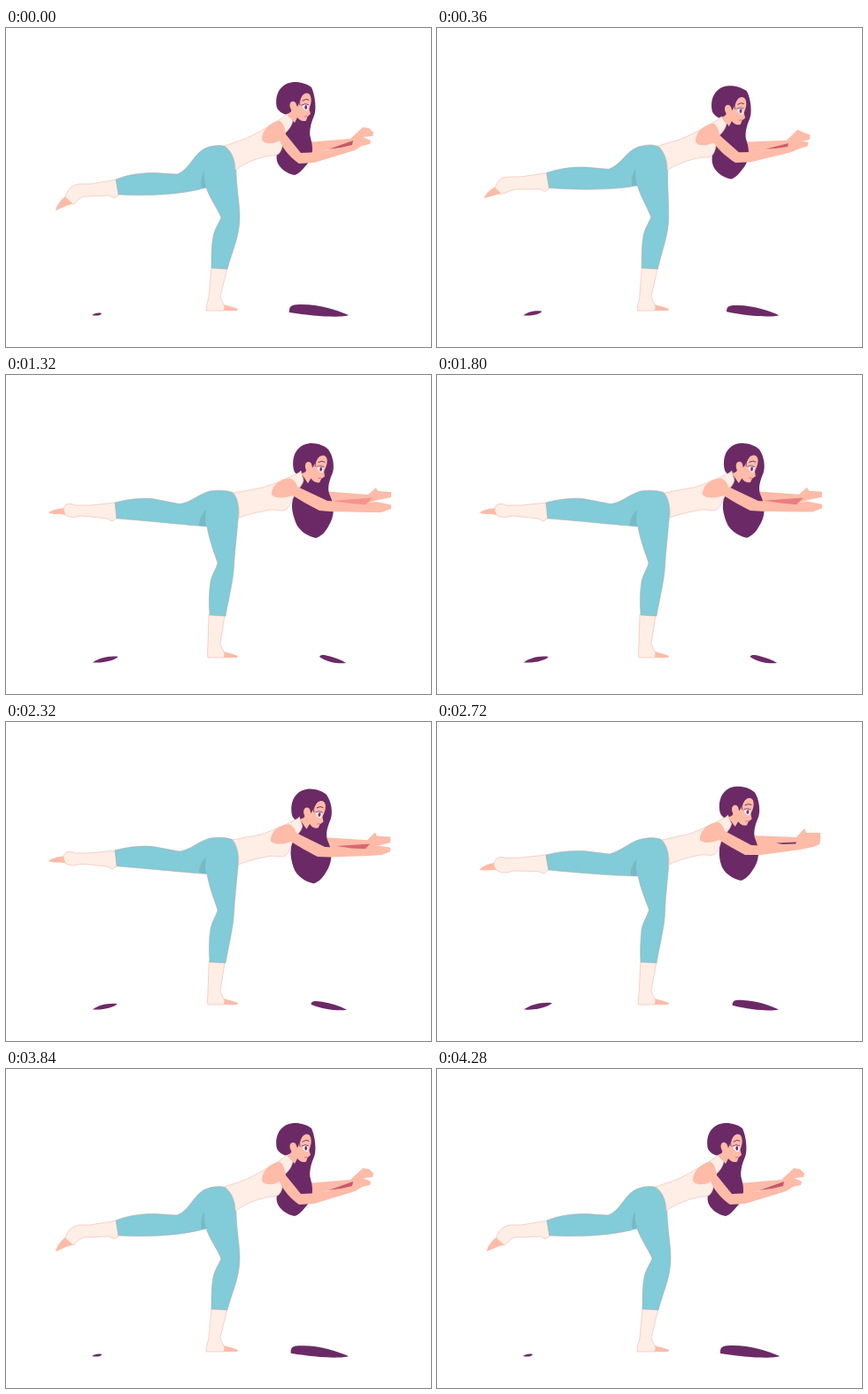
These frames come from a looping animation (480 px wide and 360 px high, 4.32 s). An HTML page:

```html
<!DOCTYPE html>
<html lang="en">
<head>
<meta charset="utf-8">
<title>Balance pose</title>
<style>
  html, body { margin: 0; width: 100%; height: 100%; overflow: hidden; background: #fff; }
  svg { display: block; width: 100vw; height: 100vh; }
  .hair { fill: #6b2a66; }
  .skin { fill: #fdbba8; }
  .top { fill: #feeee6; stroke: #eeb9ab; stroke-width: .6; }
  .pants { fill: #82cbd8; stroke: #b5a3a3; stroke-width: .5; }
  .fold { fill: #78b9c4; }
  .line { fill: none; stroke: #6b2a66; stroke-width: .9; stroke-linecap: round; }
  .gap { animation: tint 4320ms linear infinite; }
  .open { animation: blink 4320ms step-end infinite; }
  .shut { opacity: 0; animation: lid 4320ms step-end infinite; }
  @keyframes tint {
    0%, 100% { fill: #c4596b; }
    16.7% { fill: #d9626a; }
    30.5% { fill: #f59391; }
    53.7% { fill: #dd6670; }
    63% { fill: #7d3c62; }
    77.8% { fill: #cf5a68; }
  }
  @keyframes blink { 0% { opacity: 1; } 15.2% { opacity: 0; } 19% { opacity: 1; } }
  @keyframes lid { 0% { opacity: 0; } 15.2% { opacity: 1; } 19% { opacity: 0; } }
</style>
</head>
<body>
<svg viewBox="0 0 480 360">
  <!-- leaves on the floor -->
  <path class="hair" data-track="leafL"
    d="M97 324C100 322 104 321 108 322C107 325 101 325 97 324Z"
    data-to="M98 324.5C105 319 118 315.5 130 317C127 321 112 325.5 98 324.5Z"/>
  <path class="hair" data-track="leafR"
    d="M320 321C319 312 325 312 334 312C355 312 372 318 387 324C380 327 350 326 320 321Z"
    data-to="M354 318C355 315 360 316 364 317C371 319 378 321 384 325C376 326 364 325 354 318Z"/>

  <!-- legs -->
  <path class="skin" data-track="legs"
    d="M67 190C62 194 57 200 56 206L63 203L70 200L77 198Z"
    data-via="M65 159C57 160 51 163 48 167L54 167.5L61 167L68 167Z"
    data-to="M66 150C58 151 52 152 48 155.5L54 157L61 157L68 158Z"/>
  <path class="top" data-track="legs"
    d="M125 171L95 176L83 176C74 177 68 184 67 191L76 199C82 194 84 190 90 190L117 189L122 192L127 189Z"
    data-via="M123 150L95 153L78 153.5C70 150 64 155 64 162L67 167C74 172 79 170 86 168L114 168.5L121 171L126 167Z"
    data-to="M124 144L95 147L78 147C70 143 65 147 65 152L67 158C74 162 79 160 86 159L114 162L120 165L125 162Z"/>
  <path class="skin" d="M245 312C252 314 258 315 262 317L261 319L245 319Z"/>
  <path class="top" data-track="legs"
    d="M232 270L250 271L242 303C243 308 246 311 247 315L246 319L226 319C226 312 228 308 229 304Z"
    data-to="M229 270L247 271L242 303C243 308 246 311 247 315L246 319L228 319C227 312 228 308 228 304Z"/>
  <path class="pants" data-track="legs"
    d="M124 171C138 165 155 163 170 163.5L193 165C208 160 212 140 227 135C236 132 243 132 248 134C257 140 260 152 260 165C261 185 264 200 264 213C264 235 256 250 250 272L232 271C232 258 232 245 234 235C236 226 240 221 243 214C238 202 230 192 226 180C200 188 160 190 127 188Z"
    data-via="M123 150C137 146 152 145 166 145.5L195 149C209 145 215 137 229 132.5C239 130 246 130 253 132.5C260 138 263 150 261.5 164C260 183 258 198 257.5 215C257 230 252 250 248 272L230 271C229 258 230 245 231 234C233 225 237 220 239.5 212C235 200 230 188 227 174C204 173.5 165 171 126 167Z"
    data-to="M123 144C136 140.5 150 138.5 165 139.5L196 145.5C210 143.5 216 135 230 131C240 129.5 248 130 256 132.5C263 138 264 150 262 164C260.5 182 258.5 198 257.5 215C257 230 252 250 248 272L230 271C229 258 229 245 231 233C233 224 237 220 239 212C235 200 230 188 227 171C205 169.5 165 165 125 162Z"/>
  <path class="fold" data-track="legs"
    d="M221 181C219 173 221 166 224 161C223 168 225 175 226 180Z"
    data-to="M218 170C218 162 222 156 226 152C225 158 225 165 226 170.5Z"/>

  <!-- upper body -->
  <path class="skin"
    d="M340 129L389 125L403 112L410 113L415 118L414 122L404 123L394 130L340 143Z"
    data-via="M353 128L406 130L415 120L417 125L433 125L433 133L420 137L408 139L353 141Z"
    data-to="M358 131L409 135L418 127L420 131L435 132L435 138L420 141L410 144L358 143Z"/>
  <path class="hair"
    d="M306 90C303 76 309 64 322 61.5C330 60 340 63 345 67C349 75 351 92 348 99C344 108 342 118 344 124C348 138 346 148 338 156C334 161 330 165 326 166C318 165 308 158 306 150C304 142 310 125 312 110L318 98C312 97 308 94 306 90Z"
    data-to="M325 107C322 92 328 80 341 77.5C349 76 359 79 364 84C370 92 371 104 369 110C365 120 363 126 365 134C372 148 371 160 364 171C360 178 356 182 350 184C340 182 330 175 327 166C323 155 322 148 324 140L336 116C330 114 326 111 325 107Z"/>
  <path class="top"
    d="M313 101C302 107 286 118 270 125L247 133C256 140 259 150 259 160C268 154 280 148 290 146C298 143 304 145 308 142C314 136 312 126 315 119C320 114 323 110 324 104L317 97Z"
    data-to="M331 110C321 115 306 122 290 127L257 133C262 140 264 150 263 161C273 157 284 155 294 153C302 150 310 155 316 152C322 147 323 139 327 132C331 128 335 124 336 119L333 108Z"/>

  <g id="head">
    <path class="skin" d="M334 77C337 73 342 72 344 77C346 84 343 88 342.5 92L344 97L340.5 100L339 104.5C335 106 331 104 329 101L326 107C323 104 320 100 317 97C321 96 323 94 322 92C319 87 321 82 325 83C328 84 328 87 329 89C331 86 332 80 334 77Z"/>
    <path class="line" d="M335 75C332 79 331 83 332 87M335 82Q339 79 342 81"/>
    <path d="M337 100L340 99.5" stroke="#e0707a"/>
    <g class="open">
      <path fill="#fff" d="M334.5 87.5Q338 85 341.5 87L341 93Q336 94 334.5 87.5Z"/>
      <ellipse class="hair" cx="338.7" cy="89.5" rx="1.4" ry="2.4"/>
      <path class="line" d="M334 87Q338 84.5 341.5 86.5"/>
    </g>
    <path class="line shut" d="M334 89Q337 92 341 90"/>
  </g>

  <path class="skin"
    d="M289 126C289 115 298 107 309 104.5C314 108 315 114 316 120L333 141C347 141 362 138 377 135L392 129L401 122L412 127L411 131L402 133L394 138L348 152L331 153C322 147 313 137 309 127C303 131 292 132 289 126Z"
    data-via="M297 133C297 121 307 114 318 113C322 116 324 119 325 123L355 139C369 140 382 140 393 138L408 137L416 132L433 133L432 138L425 141L410 144L366 150L348 150C337 144 326 138 319 133C311 136 301 138 297 133Z"
    data-to="M300 135C300 124 310 117 321 116.5C326 119 328 122 329 126L363 142C375 143 385 143 395 143L410 144L418 143L435 146.5L435 151L424 155L410 155L366 154L354 153C342 147 332 141 324 136C316 139 304 140 300 135Z"/>
  <path class="gap"
    d="M364 137L392 127L391 132L378 135Z"
    data-via="M383 136.5L406 135.5L405 137.5L390 138Z"
    data-to="M368 142L414 138.5L406 146.5L390 145Z"/>
</svg>
<script>
  const LOOP = 4320, STEP = 40, VIA = 0.72;

  // Progress between the raised pose (0) and the level pose (1): [ms, value]
  const tracks = {
    pose: [[0, 0], [200, .06], [400, .32], [600, .71], [720, .93], [1000, .99], [1320, 1], [1800, .99],
           [2320, .9], [2720, .72], [2800, .6], [3000, .28], [3160, .12], [3360, .025], [3920, 0], [LOOP, 0]],
    legs: [[0, 0], [200, .06], [400, .32], [600, .71], [720, .93], [1320, 1], [1800, 1],
           [2320, .96], [2720, .72], [3000, .3], [3160, .14], [3360, .035], [3920, 0], [LOOP, 0]],
    leafL: [[0, 0], [200, .1], [560, .95], [720, 1], [1320, .85], [2320, .8], [2720, 1], [3160, .25], [3360, .05], [LOOP, 0]],
    leafR: [[0, 0], [200, .05], [720, .72], [1320, 1], [1700, 1], [2320, .72], [2720, .4], [3360, .18], [4100, .01], [LOOP, 0]]
  };

  // Monotone cubic through the keys, so nothing overshoots
  function sample(keys, t) {
    const i = Math.max(1, keys.findIndex(k => k[0] > t));
    const slope = j => j < 1 || j >= keys.length ? 0
      : (keys[j][1] - keys[j - 1][1]) / (keys[j][0] - keys[j - 1][0]);
    const tangent = j => {
      const a = slope(j), b = slope(j + 1);
      return a * b > 0 ? 2 * a * b / (a + b) : 0;
    };
    const [t0, v0] = keys[i - 1], [t1, v1] = keys[i];
    const h = t1 - t0, u = (t - t0) / h, w = 1 - u;
    return v0 * (1 + 2 * u) * w * w + v1 * u * u * (3 - 2 * u)
      + h * u * w * (tangent(i - 1) * w - tangent(i) * u);
  }

  const NUM = /-?\d+(\.\d+)?/g;
  function mix(a, b, p) {
    const end = b.match(NUM);
    let i = 0;
    return a.replace(NUM, n => (+n + (end[i++] - n) * p).toFixed(2));
  }

  const shapes = [...document.querySelectorAll('[data-to]')].map(el => ({
    el, from: el.getAttribute('d'), ...el.dataset
  }));
  const head = document.getElementById('head');

  function draw(t) {
    const now = {};
    for (const name in tracks) now[name] = sample(tracks[name], t);
    for (const { el, from, via, to, track = 'pose' } of shapes) {
      const p = now[track];
      const d = !via ? mix(from, to, p)
        : p < VIA ? mix(from, via, p / VIA)
        : mix(via, to, (p - VIA) / (1 - VIA));
      el.setAttribute('d', d);
    }
    const p = now.pose;
    head.setAttribute('transform', `translate(${17 * p} ${15.5 * p}) rotate(${7 * p} 328 90)`);
  }

  function tick() {
    draw(Math.floor(performance.now() % LOOP / STEP) * STEP);
    requestAnimationFrame(tick);
  }
  tick();
</script>
</body>
</html>
```
